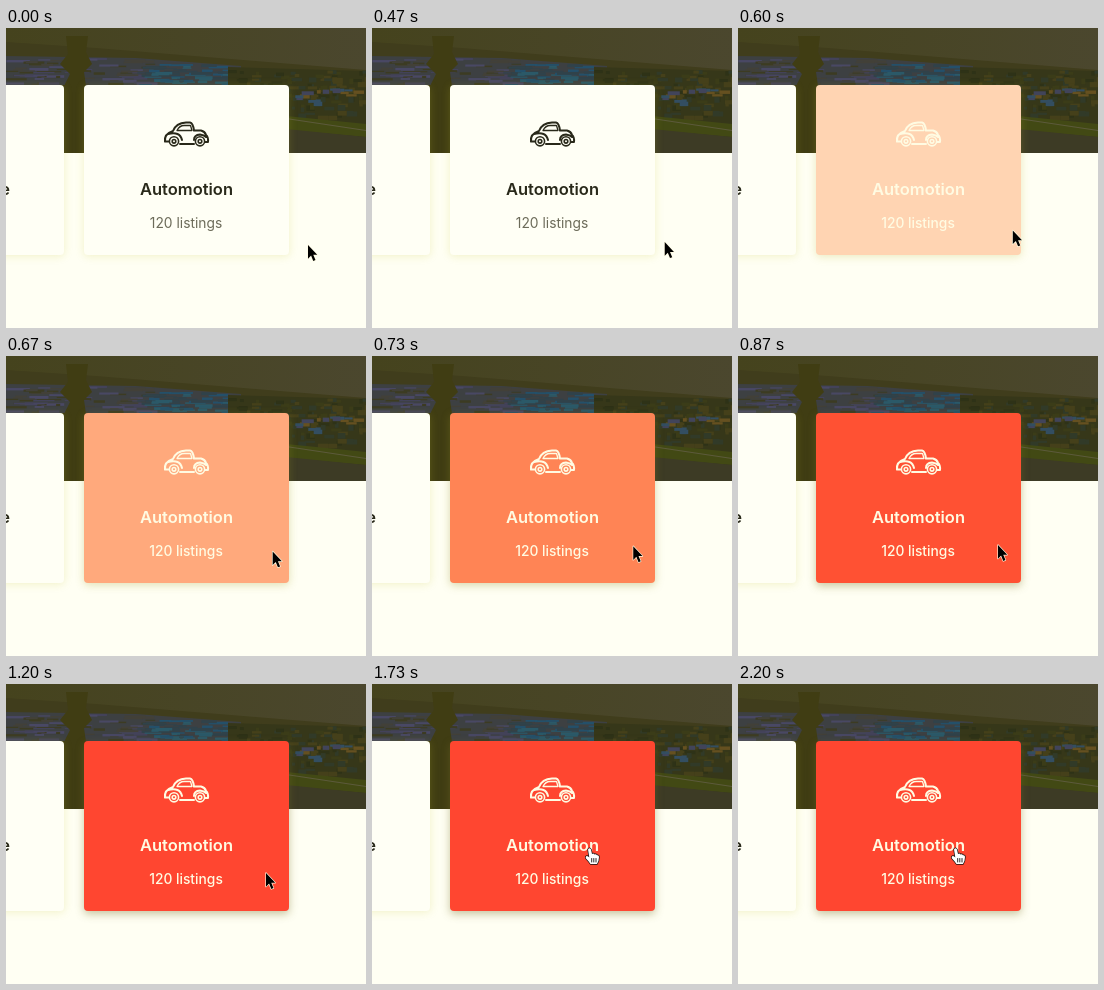
Recreate the animation shown at these times as an HTML page with a canvas. Size 360 px wide and 300 px high, loop 2270 ms.

```html
<!DOCTYPE html>
<html lang="en">
<head>
<meta charset="utf-8">
<title>Category card</title>
<style>
html, body { margin: 0; width: 100%; height: 100%; overflow: hidden; background: #fffff3; }
canvas { display: block; }
</style>
</head>
<body>
<canvas id="stage" width="360" height="300"></canvas>
<script>
const ctx = document.getElementById('stage').getContext('2d');
const LOOP = 2270, STEP = 200 / 3, HOVER = 540, FADE = 420;
const PAPER = '#fffff5', PAGE = '#fffff3', DARK = '#29291a', LIGHT = '#fffbe2';

const mix = (a, b, k) => a + (b - a) * k;
const span = (t, start, length) => Math.min(1, Math.max(0, (t - start) / length));
const smooth = u => u * u * (3 - 2 * u);

function random(seed) {
  return () => (seed = (seed * 16807) % 2147483647) / 2147483647;
}

function poly(color, ...p) {
  ctx.beginPath();
  for (let i = 0; i < p.length; i += 2) ctx.lineTo(p[i], p[i + 1]);
  ctx.closePath();
  ctx.fillStyle = color;
  ctx.fill();
}

// Flat flecks scattered over a box, as on water or foliage
function flecks(count, x, y, w, h, length, height, colors, rnd) {
  for (let i = 0; i < count; i++) {
    ctx.fillStyle = colors[Math.floor(rnd() * colors.length)];
    ctx.fillRect(x + rnd() * w, y + rnd() * h, length * (0.4 + rnd()), height * (0.5 + rnd()));
  }
}

function scene() {
  const rnd = random(71);
  ctx.save();
  ctx.beginPath();
  ctx.rect(0, 0, 360, 125);
  ctx.clip();
  const g = ctx.createLinearGradient(0, 0, 360, 40);
  g.addColorStop(0, '#45431d');
  g.addColorStop(1, '#4b472e');
  ctx.fillStyle = g;
  ctx.fillRect(0, 0, 360, 125);
  poly('#403d1c', 0, 14, 90, 20, 360, 42, 360, 50, 0, 30);
  poly('#3d4042', 0, 28, 130, 30, 235, 38, 235, 60, 0, 60);
  flecks(70, -10, 29, 150, 28, 18, 2, ['#494864', '#434259', '#3c3b22', '#424038'], rnd);
  flecks(70, 130, 36, 92, 22, 16, 2, ['#24506a', '#2b5968', '#30424a'], rnd);
  poly('#363719', 222, 39, 360, 43, 360, 125, 222, 125);
  flecks(130, 222, 42, 140, 46, 8, 4, ['#2e3217', '#3b3c18', '#313a28', '#45401a'], rnd);
  flecks(16, 284, 60, 66, 16, 9, 3, ['#334e61', '#41445a', '#655020'], rnd);
  poly('#424914', 280, 88, 360, 96, 360, 109, 280, 102);
  poly('#3d3b25', 280, 101, 360, 109, 360, 125, 280, 125);
  poly('#5c5a3c', 280, 90, 360, 102, 360, 103, 280, 91);
  poly('#403d13', 0, 57, 80, 57, 80, 125, 0, 125);
  poly('#403d13', 60, 8, 82, 8, 80, 24, 86, 36, 78, 44, 80, 58, 58, 58, 64, 46, 54, 36, 62, 26);
  ctx.restore();
}

function card(x, color, depth) {
  ctx.save();
  ctx.shadowColor = `rgba(${mix(190, 120, depth)},${mix(190, 112, depth)},40,${mix(0.22, 0.42, depth)})`;
  ctx.shadowBlur = mix(8, 9, depth);
  ctx.shadowOffsetY = mix(1, 3, depth);
  ctx.fillStyle = color;
  ctx.beginPath();
  ctx.roundRect(x, 57, 205, 170, 4);
  ctx.fill();
  ctx.restore();
}

// Blue drops out sooner than green, so white passes through orange to red
function cardColor(k) {
  const green = mix(252, 70, k), blue = mix(48, 238, (1 - k) ** 1.5);
  return `rgb(255,${Math.round(green)},${Math.round(blue)})`;
}

function label(text, x, y, size, weight, color, align = 'center') {
  ctx.font = `${weight} ${size}px Inter, "Open Sans", sans-serif`;
  ctx.textAlign = align;
  ctx.fillStyle = color;
  ctx.fillText(text, x, y);
}

const carBody = new Path2D(
  'M162.5 113.5H159Q158 106 167 103Q170 95 180 94.5H184Q187 95 188 102.5' +
  'H195Q199 103.5 200 107Q202.5 109 202 114H199.5M174 116H188' +
  'M162 106Q174 103 176 112M188 112Q188 107 194 106.5Q198 107 200 109');
const carGlass = new Path2D('M171 102.5Q173.5 97.5 178 97.5H184.5L186 102.5Z');

function car(color) {
  ctx.strokeStyle = color;
  ctx.lineJoin = ctx.lineCap = 'round';
  ctx.lineWidth = 2;
  ctx.stroke(carBody);
  ctx.lineWidth = 1.3;
  ctx.stroke(carGlass);
  for (const x of [168, 194]) {
    for (const r of [4.6, 1.8]) {
      ctx.lineWidth = 1.6;
      ctx.beginPath();
      ctx.arc(x, 113.3, r, 0, Math.PI * 2);
      ctx.stroke();
    }
  }
}

const arrow = new Path2D('M0 0V14.5L3.5 11.3L6 17L8.5 16L6 10.5H10.5Z');
const hand = new Path2D(
  'M-1 1.5Q.5-1 2 1.5L3 6Q4.5 4.7 5.5 6.5Q7 5.5 8 7.3Q10 6.8 10 9' +
  'Q10 13 8 16H1.5Q0 13.5-3 10.5Q-4 8.5-2 8Q-.7 8.2.3 9.5Z');
const knuckles = new Path2D('M2.7 10.5V14M4.8 10.5V14M7 10.5V14');

function cursor(x, y) {
  const onLink = x < 228 && y < 173;
  const shape = onLink ? hand : arrow;
  ctx.save();
  ctx.translate(x, y);
  if (!onLink) ctx.scale(0.88, 0.94);
  ctx.lineJoin = 'round';
  ctx.lineWidth = 1.4;
  ctx.strokeStyle = onLink ? '#111' : LIGHT;
  ctx.fillStyle = onLink ? '#fff' : '#000';
  ctx.stroke(shape);
  ctx.fill(shape);
  if (onLink) {
    ctx.lineWidth = 0.9;
    ctx.stroke(knuckles);
  }
  ctx.restore();
}

function pointer(t) {
  const enter = smooth(span(t, 330, 450)), toLink = smooth(span(t, 1300, 350));
  return [
    302 - 42 * enter - 43 * toLink,
    217 - 28 * enter ** 1.5 - 25 * toLink
  ];
}

function draw(t) {
  const hover = t >= HOVER;
  const k = Math.sin(span(t, HOVER, FADE) * Math.PI / 2);
  const ink = hover ? LIGHT : DARK;
  ctx.fillStyle = PAGE;
  ctx.fillRect(0, 0, 360, 300);
  scene();
  card(-147, PAPER, 0);
  label('e', 4, 167, 16.5, 600, DARK, 'right');
  card(78, hover ? cardColor(k) : PAPER, k);
  car(ink);
  label('Automotion', 180.5, 167, 16.5, 600, ink);
  label('120 listings', 180, 200, 13.8, hover ? 500 : 400, hover ? ink : '#6c6b59');
  cursor(...pointer(t));
}

function tick(now) {
  const n = Math.min(33, Math.floor((now % LOOP + 4) / STEP));
  draw(n * STEP);
  requestAnimationFrame(tick);
}
requestAnimationFrame(tick);
</script>
</body>
</html>
```
